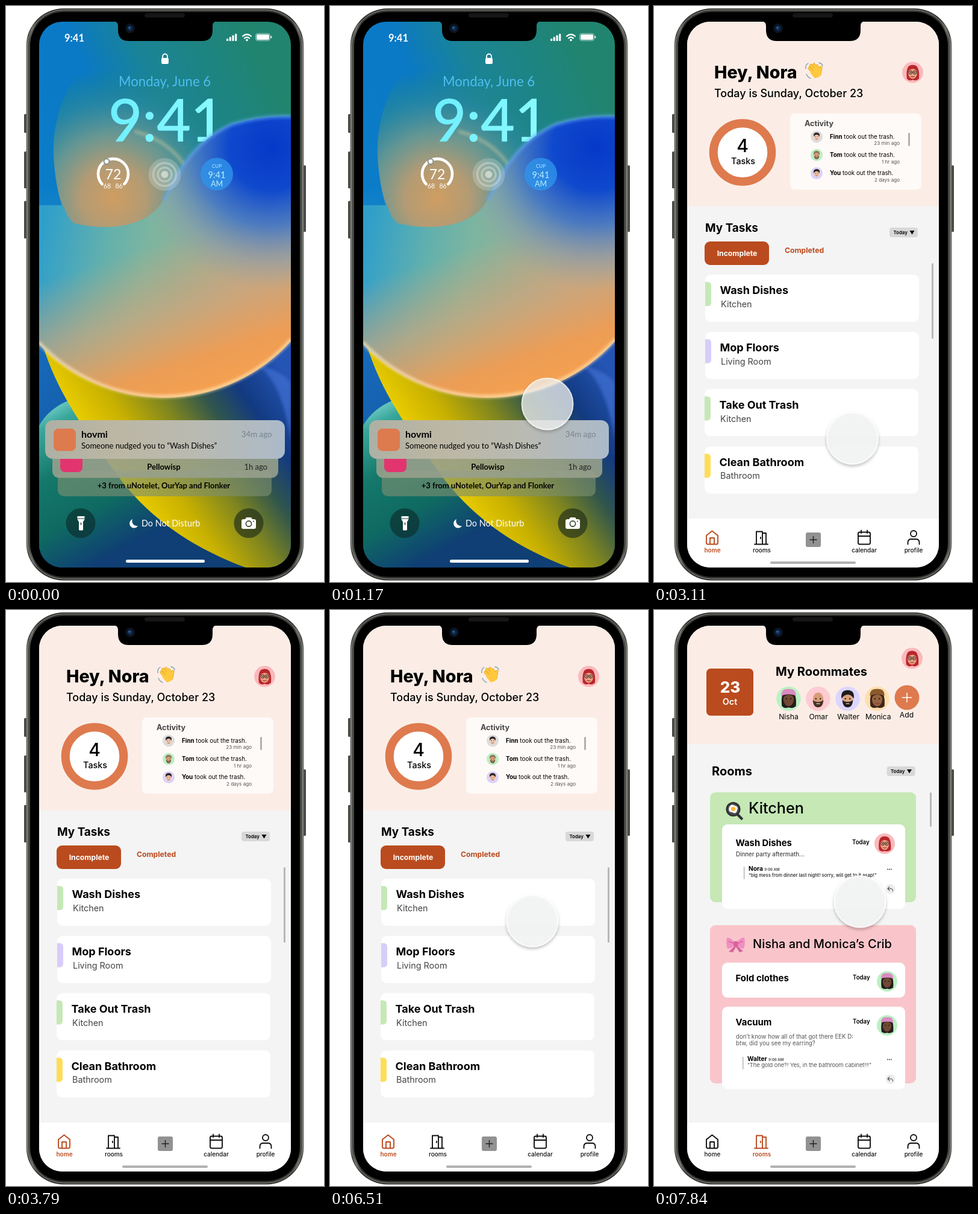
Recreate the animation shown at these times as an HTML page. Size 528 px wide and 954 px high, loop 8000 ms.

```html
<!DOCTYPE html>
<html lang="en">
<head>
<meta charset="utf-8">
<title>Chores app demo</title>
<style>
html, body { margin: 0; width: 100%; height: 100%; overflow: hidden; background: #fff; }
svg { display: block; width: 528px; height: 954px; }
text { white-space: pre; }
.lato text { font-family: Lato, sans-serif; }
.app text { font-family: Inter, sans-serif; }
</style>
</head>
<body>
<svg id="stage" viewBox="0 0 528 954" xmlns="http://www.w3.org/2000/svg"></svg>
<script>
const LOOP = 8000;
const RUST = '#ba4b1e', ORANGE = '#de7a4e', GREEN = '#c5e8b5', PINK = '#f9c5ca';

const rect = (x, y, w, h, r, fill, more = '') =>
  `<rect x="${x}" y="${y}" width="${w}" height="${h}" rx="${r}" fill="${fill}" ${more}/>`;
const circle = (x, y, r, fill, more = '') =>
  `<circle cx="${x}" cy="${y}" r="${r}" fill="${fill}" ${more}/>`;
const path = (d, fill, more = '') => `<path d="${d}" fill="${fill}" ${more}/>`;
const line = (d, stroke, width, more = '') =>
  path(d, 'none', `stroke="${stroke}" stroke-width="${width}" stroke-linecap="round" stroke-linejoin="round" ${more}`);
const text = (x, y, size, str, weight = 400, fill = '#000', anchor = 'start', more = '') =>
  `<text x="${x}" y="${y}" font-size="${size}" font-weight="${weight}" fill="${fill}" text-anchor="${anchor}" ${more}>${str}</text>`;
const mid = (x, y, size, str, weight, fill) => text(x, y, size, str, weight, fill, 'middle');
const end = (x, y, size, str, weight, fill) => text(x, y, size, str, weight, fill, 'end');
const at = (x, y, scale, body) => `<g transform="translate(${x} ${y}) scale(${scale})">${body}</g>`;

// Each stop is "offset colour [opacity]"
const stops = list => list.map(s => {
  const [offset, color, opacity = 1] = s.split(' ');
  return `<stop offset="${offset}" stop-color="${color}" stop-opacity="${opacity}"/>`;
}).join('');
const linear = (id, x1, y1, x2, y2, ...list) =>
  `<linearGradient id="${id}" gradientUnits="userSpaceOnUse" x1="${x1}" y1="${y1}" x2="${x2}" y2="${y2}">${stops(list)}</linearGradient>`;
const radial = (id, x, y, r, ...list) =>
  `<radialGradient id="${id}" gradientUnits="userSpaceOnUse" cx="${x}" cy="${y}" r="${r}">${stops(list)}</radialGradient>`;

const defs = `<defs>
  <clipPath id="screen">${rect(55, 26, 418, 904, 38, '#000')}</clipPath>
  <filter id="soft" x="-20%" y="-20%" width="140%" height="140%"><feGaussianBlur stdDeviation="2.5"/></filter>
  <filter id="shadow" x="-30%" y="-30%" width="160%" height="160%">
    <feDropShadow dx="0" dy="3" stdDeviation="2.5" flood-color="#000" flood-opacity=".28"/></filter>
  ${linear('metal', 34, 0, 494, 0, '0 #777a74', '.008 #3d403b', '.02 #62655f', '.04 #343632', '.96 #343632', '.98 #62655f', '.992 #3d403b', '1 #777a74')}
  ${linear('sky', 70, 260, 430, 100, '0 #0b7cc8', '.3 #0a79c6', '.55 #1a8496', '1 #21846f')}
  ${linear('skyLow', 0, 300, 0, 480, '0 #39a6c8 0', '1 #39a6c8 .8')}
  ${radial('arm', 178, 318, 215, '0 #cf9d62', '.25 #b39b74', '.5 #6b9890 .95', '.75 #2d8a98 .7', '1 #1f8578 0')}
  ${linear('ball', 55, 400, 400, 470, '0 #2f9fca', '.3 #62b0ad', '.5 #7db5a0', '1 #a9a98f')}
  ${linear('warm', 245, 395, 330, 650, '0 #e0a070 0', '.4 #dba475 .6', '.75 #f09c52 .95', '1 #f8a14e')}
  ${radial('deep', 440, 235, 235, '0 #0638c8', '.3 #0f49cd', '.55 #3c73c8 .85', '.8 #7e98b2 .5', '1 #8fa5a5 0')}
  ${linear('low', 55, 600, 400, 930, '0 #1668b8', '1 #143b78')}
  ${linear('band', 145, 760, 430, 560, '0 #fff27a', '.04 #eed000', '.25 #c7b000', '.45 #7d8420', '.62 #31564c', '.78 #123a80', '1 #2454b4')}
  ${linear('dome', 60, 665, 190, 900, '0 #7ad3cf', '.12 #3aa79c', '.4 #14786a', '.7 #0f6a62', '1 #0f3f74')}
  ${linear('clock', 172, 160, 345, 220, '0 #6ceeff', '1 #8cfbff')}
  ${linear('note', 65, 0, 463, 0, '0 #aeb0a4', '.3 #bcb7a4', '.65 #b9bab2', '1 #abbac9')}
</defs>`;

function phone() {
  const side = (x, y, h) => rect(x, y, 5, h, 1.5, '#454843');
  return side(30, 179, 31) + side(30, 241, 61) + side(30, 323, 62) + side(493, 264, 110)
    + rect(33.5, 4, 461, 947.5, 62, 'url(#metal)')
    + rect(36, 6.5, 456, 942.5, 60, 'none', 'stroke="#8b8e87" stroke-width="1"')
    + rect(40, 10, 448, 935.5, 55, '#000');
}

function notch() {
  return path('M179 25 Q186 26 186 33 V40 Q186 58 204 58 H325 Q343 58 343 40 V33 Q343 26 350 25Z', '#000')
    + rect(230, 12, 67, 7, 3.5, '#161616')
    + circle(206, 37, 8, '#0b1220') + circle(206, 37, 4.5, '#10294a') + circle(205, 36, 1.8, '#2b64a0');
}

function wallpaperBack() {
  return rect(55, 26, 418, 904, 0, 'url(#sky)') + rect(55, 300, 150, 300, 0, 'url(#skyLow)')
    + path('M170 58 C105 105 76 180 79 250 C83 310 95 345 112 362 C220 400 300 300 473 200 V26 H250Z', 'url(#arm)')
    + line('M215 208 Q268 222 297 264', '#d5cda0', 5, 'opacity=".5" filter="url(#soft)"');
}

function wallpaperFront() {
  const wave = 'C280 288 306 226 375 196 Q425 181 473 183';
  const body = `M55 330 L95 330 Q101 350 112 360 C180 375 240 362 262 320 ${wave} V555 A285 285 0 0 1 55 560Z`;
  return rect(55, 550, 418, 380, 0, 'url(#low)')
    + path('M55 695 Q72 665 108 652 L270 850 L400 930 H55Z', 'url(#dome)')
    + path('M60 558 C84 640 130 700 176 765 C222 832 290 890 398 930 H473 V540Z', 'url(#band)')
    + path('M422 597 Q455 602 473 624 V720 Q460 630 422 597Z', '#3f70d2', 'opacity=".7" filter="url(#soft)"')
    + ['ball', 'warm', 'deep'].map(id => path(body, `url(#${id})`)).join('')
    + line(`M262 320 ${wave}`, '#5fa4f2', 5, 'opacity=".75" filter="url(#soft)"')
    + line('M473 553 A285 285 0 0 1 55 558', '#ffe6b4', 4, 'filter="url(#soft)"');
}

function statusBar() {
  const bars = [0, 1, 2, 3].map(i => rect(366 + i * 4.7, 54 - i * 2.7, 3.2, 4 + i * 2.7, 1, '#fff')).join('');
  return text(97, 58.5, 16.5, '9:41', 700, '#fff') + bars
    + line('M393 50 Q400 44 407 50', '#fff', 2.2) + line('M396 53.4 Q400 50 404 53.4', '#fff', 2.2) + circle(400, 56.4, 1.8, '#fff')
    + rect(414.5, 45.5, 24, 12, 3.5, 'none', 'stroke="#fff" stroke-opacity=".6"') + rect(416, 47, 21, 9, 2, '#fff')
    + rect(439.6, 49.5, 1.6, 4, .8, '#fff');
}

function widgets() {
  const pale = '#b8f1ff';
  return line('M159.6 295 A25 25 0 1 1 196.4 295', '#fff', 4.6)
    + circle(167, 257.5, 4.4, '#fff', 'stroke="#87918a" stroke-width="2"')
    + mid(178, 286.5, 23, '72', 400, '#fff') + mid(168, 302, 10.5, '68', 400, '#fff') + mid(187.5, 302, 10.5, '86', 400, '#fff')
    + circle(263.5, 279, 27, '#fff', 'opacity=".2"')
    + [19, 11.5].map(r => circle(263.5, 279, r, 'none', 'stroke="#d4dcd0" stroke-width="3.5" opacity=".5"')).join('')
    + circle(263.5, 279, 6, '#dde4da', 'opacity=".75"')
    + circle(350, 278.5, 27, '#2f95ec', 'opacity=".78"')
    + mid(350, 268, 8, 'CUP', 400, pale) + mid(350, 284.5, 14.5, '9:41', 400, pale) + mid(350, 299, 12.5, 'AM', 400, pale);
}

function notifications() {
  return rect(86, 770, 355, 42, 10, '#7f9070', 'opacity=".62"')
    + mid(262, 799, 13, '+3 from uNotelet, OurYap and Flonker', 700)
    + rect(77, 735, 375, 46.5, 11, '#97a08c', 'opacity=".9"')
    + rect(90, 735, 37, 37, 8, '#e2356f')
    + mid(262, 768, 13, 'Pellowisp', 700) + end(434, 768, 13, '1h ago', 400, '#20241f')
    + rect(65, 686, 398, 64, 13, 'url(#note)')
    + rect(79, 700, 37, 37, 8, '#dd7a4e')
    + text(125, 715, 16, 'hovmi', 700) + text(125, 733, 13, 'Someone nudged you to “Wash Dishes”')
    + end(441.5, 714, 13.3, '34m ago', 400, '#77838e');
}

function lockControls() {
  const dark = 'opacity=".68"';
  return circle(124, 856.5, 24.5, '#0b302f', dark) + circle(403, 856.5, 24.5, '#22301b', dark)
    + path('M118.5 845 H130.5 V849.5 Q130 852 128 854 V867 Q128 868.5 126.5 868.5 H122.5 Q121 868.5 121 867 V854 Q119 852 118.5 849.5Z', '#fff')
    + line('M119 849 H130', '#28443f', 1) + line('M124.5 856 V859', '#28443f', 1.5)
    + path('M394 850 H397 L399 847 H407 L409 850 H412 Q415 850 415 853 V863 Q415 866 412 866 H394 Q391 866 391 863 V853 Q391 850 394 850Z', '#fff')
    + circle(403, 857.5, 4.6, 'none', 'stroke="#333e2a" stroke-width="1.6"') + circle(411, 853.5, 1, '#333e2a')
    + path('M210 850 A7.5 7.5 0 1 0 219 861 A8 8 0 0 1 210 850Z', '#fff')
    + text(225, 862, 14.4, 'Do Not Disturb', 400, '#fff')
    + rect(199, 917, 131, 5, 2.5, '#fff');
}

function lockScreen() {
  return wallpaperBack()
    + text(187, 133, 22.2, 'Monday, June 6', 400, '#4fbdf0')
    + text(170, 224, 97, '9:41', 400, 'url(#clock)', 'start', 'stroke="url(#clock)" stroke-width="1.2"')
    + wallpaperFront() + statusBar()
    + line('M260 87 V83.5 A4 4 0 0 1 268 83.5 V87', '#fff', 1.8) + rect(258, 86, 12, 10, 2, '#fff')
    + widgets() + notifications() + lockControls();
}

// Avatars are drawn in a 40-unit circle around the origin
const looks = {
  red: { bg: '#fbb9bb', skin: '#e9a183', hair: '#b9262c', long: 1, glasses: 1 },
  pale: { bg: '#dcdcdc', skin: '#efc6ad', hair: '#2f2826' },
  cap: { bg: '#bdeec3', skin: '#d8a37c', hair: '#8c7a62', beard: '#75573f' },
  violet: { bg: '#dbd2fb', skin: '#efc0a2', hair: '#2b2321' },
  beanie: { bg: '#bdf0c5', skin: '#704934', hair: '#231c1c', long: 1, hat: '#d98bc0' },
  bald: { bg: '#ffcbd3', skin: '#d79c78', beard: '#4b3024' },
  dark: { bg: '#dcd6ff', skin: '#d9a27c', hair: '#1d1b1d', beard: '#211c1c' },
  brown: { bg: '#ffdfae', skin: '#97633f', hair: '#3d251a', long: 1, hat: '#8b5a2b' }
};
function avatar(x, y, r, name) {
  const { bg, skin, hair, long, glasses, beard, hat } = looks[name];
  return at(x, y, r / 20, circle(0, 0, 20, bg)
    + (long ? path('M-11 12 Q-14 -14 0 -14 Q14 -14 12 12 Q6 17 0 14 Q-6 17 -11 12Z', hair) : '')
    + `<ellipse cy="1" rx="8.5" ry="11" fill="${skin}"/>`
    + (beard ? path('M-8.7 2 Q-5 6 0 5 Q5 6 8.7 2 Q8 14 0 14 Q-8 14 -8.7 2Z', beard) + line('M-2.5 8 H2.5', '#f1d4c6', 1.3) : line('M-3 7.5 Q0 9.5 3 7.5', '#8c3a35', 1.3))
    + (hair ? path('M-10 0 Q-12 -14 0 -14 Q12 -14 10 0 Q7 -6 1 -7 Q-6 -7 -10 0Z', hair) : '')
    + (hat ? path('M-12 -5 Q-12 -17 0 -16 Q12 -17 12 -5 Q0 -10 -12 -5Z', hat) : '')
    + circle(-3.6, 0, 1.2, '#222') + circle(3.6, 0, 1.2, '#222')
    + (glasses ? [-4, 4].map(c => circle(c, 0, 3.3, 'none', 'stroke="#332222" stroke-width="1.1"')).join('') : ''));
}

function wave() {
  const fingers = 'M258 103 L267 113 M260.5 98.5 L270 110 M265.5 97 L273 108 M270.5 99 L275 108 M277 102 L275 113';
  return line(fingers, '#d99a1e', 5) + line(fingers, '#ffc83d', 4) + circle(270, 112, 6.8, '#ffc83d')
    + line('M262 110 L268 117', '#ffc83d', 5)
    + line('M252 104 Q251 97 256 95 M274 94 Q279 95 280 99 M253 113 Q255 118 260 120', '#7c9db0', 1.3);
}

function pan() {
  return line('M138 338 L145.5 345.5', '#333', 4.5) + circle(131.5, 330, 12, '#2d2e31') + circle(131.5, 330, 9.7, '#4a4b4f')
    + path('M125 326 Q129 320 134 324 Q141 325 138 332 Q136 339 130 335 Q122 335 125 326Z', '#fff') + circle(131.5, 329.5, 3.6, '#ffb52c');
}

function bow() {
  return path('M134 556 L124 566 L131 567 L136 558 L142 567 L148 565 L138 556Z', '#d4679f')
    + path('M135 552 Q127 541 121 543 Q119 552 122 561 Q130 560 135 554Z M136 552 Q144 541 150 543 Q152 552 149 561 Q141 560 136 554Z', '#ef8fc0')
    + line('M124 549 L132 552 M147 549 L139 552', '#c95895', 1.2) + rect(132, 548.5, 7.5, 9, 3, '#d9629f');
}

function navBar(active) {
  const ink = name => name === active ? RUST : '#111';
  const label = (x, name) => mid(x, 905, 10, name, name === active ? 600 : 500, ink(name));
  return rect(55, 849, 418, 81, 0, '#fff')
    + line('M87 877 L96.5 869.5 L106 877 V889 Q106 891.5 103.5 891.5 H89.5 Q87 891.5 87 889Z M93 891 V881 H100 V891', ink('home'), 1.9)
    + line('M167 891.5 H189 M170 891 V870.5 H180 V891 M180 873 H186 V891 M177 880 V882', ink('rooms'), 1.9)
    + rect(252, 872, 25, 24, 3, '#929292') + line('M259 884 H270 M264.5 878.5 V889.5', '#222', 1.5)
    + rect(339, 871.5, 20, 20, 2.5, 'none', 'stroke="#111" stroke-width="1.9"') + line('M339 878 H359 M344 868.5 V873 M354 868.5 V873', '#111', 1.9)
    + circle(431, 874, 5, 'none', 'stroke="#111" stroke-width="1.9"') + line('M421.5 891.5 V888 Q422 883 427 883 H435 Q440 883 440.5 888 V891.5', '#111', 1.9)
    + label(97, 'home') + label(179, 'rooms') + label(349, 'calendar') + label(431, 'profile')
    + rect(193, 920, 142, 4, 2, '#b1b1b1');
}

const backdrop = split => rect(55, 26, 418, 904, 0, '#f4f4f4') + rect(55, 26, 418, split - 26, 0, '#fbede6');
const todayMenu = (x, y) => rect(x, y, 47, 16, 4, '#d8d8d8') + text(x + 6.5, y + 11, 7.9, 'Today', 600)
  + path(`M${x + 33.5} ${y + 5} h8 l-4 6.5z`, '#000');

function homeScreen() {
  const activity = [['pale', 'Finn', '23 min ago'], ['cap', 'Tom', '1 hr ago'], ['violet', 'You', '2 days ago']];
  const tasks = [['Wash Dishes', 'Kitchen', '#c6e8b6'], ['Mop Floors', 'Living Room', '#d7cdf9'],
    ['Take Out Trash', 'Kitchen', '#c6e8b6'], ['Clean Bathroom', 'Bathroom', '#ffdd57']];
  return backdrop(331.5)
    + text(100, 119.5, 28.6, 'Hey, Nora', 800) + wave() + avatar(429.5, 110, 17.5, 'red')
    + text(100, 151, 18, 'Today is Sunday, October 23', 500)
    + circle(147, 242.5, 48.3, '#fff', `stroke="${ORANGE}" stroke-width="14"`)
    + mid(147, 242, 30, '4', 500) + mid(148, 261.5, 14.3, 'Tasks', 500)
    + rect(226, 178, 218, 126, 8, '#fefaf8') + text(250, 199, 12.6, 'Activity', 700, '#444')
    + rect(422, 210, 3, 22, 1.5, '#b0b0b0')
    + activity.map(([look, who, ago], i) => {
      const y = 219.5 + i * 30.3;
      return avatar(270, y - 3, 10, look)
        + text(292, y, 9.8, `<tspan font-weight="700">${who}</tspan> took out the trash.`) + end(408, y + 10.7, 8.1, ago, 400, '#555');
    }).join('')
    + text(85, 373.5, 18.9, 'My Tasks', 700) + todayMenu(391, 367)
    + rect(84, 390, 107, 39, 9, RUST) + mid(138, 413.5, 12.2, 'Incomplete', 700, '#fff') + text(217, 409, 12.2, 'Completed', 700, RUST)
    + tasks.map(([title, room, color], i) => {
      const x = i < 2 ? 85 : 84, y = 445 + i * 94.8;
      return rect(x, y, 355, 78, 9, '#fff') + path(`M${x} ${y + 12} h4 q6 0 6 6 v28 q0 6 -6 6 h-4z`, color)
        + text(x + 24.5, y + 32.3, 18, title, 700) + text(x + 26, y + 54, 14.4, room, 400, '#444');
    }).join('')
    + rect(461, 426, 3, 125, 1.5, '#b7b7b7') + navBar('home');
}

function reply(x, y, barX, who, quote, size, weight) {
  return rect(barX, y - 7, 2.5, 21, 1, '#cfcfcf')
    + text(x, y, 10.2, `${who} <tspan font-size="6" fill="#555">9:06 AM</tspan>`, 700) + text(x, y + 10, size, quote, weight, '#222')
    + [388, 391, 394].map(c => circle(c, y - 2.5, .9, '#333')).join('')
    + circle(392.5, y + 30, 8, '#ececec') + line(`M391 ${y + 26.5} l-3 3 l3 3 M388 ${y + 29.5} h5 q3.5 0 3.5 4`, '#555', 1.1);
}

function roomsScreen() {
  const mates = [['beanie', 'Nisha'], ['bald', 'Omar'], ['dark', 'Walter'], ['brown', 'Monica']];
  const task = (y, title, look) => text(135.5, y, 14.9, title, 700) + text(330, y - 3.5, 9.7, 'Today', 600) + avatar(387, y, 17, look);
  return backdrop(222)
    + rect(87, 97, 78, 78, 7, RUST) + mid(126.5, 136.5, 26, '23', 800, '#fff') + mid(126, 157, 14.3, 'Oct', 600, '#fff')
    + text(202, 109, 20.1, 'My Roommates', 700) + avatar(428.5, 80, 17.5, 'red')
    + mates.map(([look, name], i) => avatar(223.5 + i * 49, 147, 20.3, look) + mid(223.5 + i * 49.6, 181, 12.2, name)).join('')
    + circle(420, 145, 20.5, ORANGE) + line('M412.5 145 H427.5 M420 137.5 V152.5', '#fff', 1.5) + mid(419.5, 178, 12.2, 'Add')
    + text(96, 274, 20, 'Rooms', 700) + todayMenu(386.5, 259) + rect(458, 302, 3, 57, 1.5, '#b7b7b7')
    + rect(93, 302, 342, 182, 9, GREEN) + pan() + text(157, 337, 25.2, 'Kitchen', 500)
    + rect(113, 355, 304, 140, 9, '#fff')
    + text(135.5, 391, 14.8, 'Wash Dishes', 700) + text(329, 388, 9.7, 'Today', 600) + avatar(383, 387, 17, 'red')
    + text(136, 408, 9.7, 'Dinner party aftermath...', 500, '#444')
    + reply(157, 432, 148.5, 'Nora', '“big mess from dinner last night! sorry, will get to it asap!”', 7.7, 500)
    + rect(93, 522, 342, 262, 9, PINK) + bow() + text(164, 560, 20, 'Nisha and Monica’s Crib', 500)
    + rect(113, 584, 304, 58, 9, '#fff') + task(615, 'Fold clothes', 'beanie')
    + rect(113, 657, 304, 136.5, 9, '#fff') + task(688, 'Vacuum', 'beanie')
    + text(136, 709.5, 9.7, 'don’t know how all of that got there EEK D:', 400, '#555')
    + text(136, 721, 9.7, 'btw, did you see my earring?', 400, '#555')
    + reply(155, 747, 146.5, 'Walter', '“The gold one?! Yes, in the bathroom cabinet!!!”', 9.3, 300)
    + navBar('rooms');
}

const screen = (id, kind, body) => `<g id="${id}" class="${kind}" clip-path="url(#screen)">${body}</g>`;
document.getElementById('stage').innerHTML = defs + phone()
  + screen('lock', 'lato', lockScreen()) + screen('home', 'app', homeScreen()) + screen('rooms', 'app', roomsScreen())
  + notch()
  + `<g id="touch" filter="url(#shadow)">${circle(0, 0, 42.5, '#f4f5f5', 'fill-opacity=".78" stroke="#fff" stroke-opacity=".75" stroke-width="2"')}</g>`;

const [lock, home, rooms, touch] = ['lock', 'home', 'rooms', 'touch'].map(id => document.getElementById(id));
const touchDisc = touch.firstChild;

// Held touch positions: [start ms, x, y]; no position means the finger is lifted
const touches = [[0], [950, 458, 485], [1060, 397, 596], [1170, 361, 659],
  [1530, 351, 676], [1637, 342, 692], [1743, 334, 706], [1850, 329, 715],
  [3110, 329.5, 716], [3790], [5270, 328, 624], [5560, 328, 576], [5740, 333, 543], [5860, 337, 521],
  [6300, 336.5, 518], [6510, 336, 515], [7340, 336, 508],
  [7490, 338, 500], [7607, 339, 494], [7723, 341, 488], [7840, 342, 483]];

const show = (node, on) => node.setAttribute('display', on ? 'inline' : 'none');

function render(t) {
  show(lock, t < 3110);
  show(home, t >= 3110 && t < 6910);
  show(rooms, t >= 6910);
  const [, x, y] = touches.findLast(p => p[0] <= t);
  show(touch, x !== undefined);
  if (x === undefined) return;
  touch.setAttribute('transform', `translate(${x} ${y})`);
  touchDisc.setAttribute('fill-opacity', t < 3110 ? .72 : .9);
}

function tick() {
  render(performance.now() % LOOP);
  requestAnimationFrame(tick);
}
tick();
</script>
</body>
</html>
```
